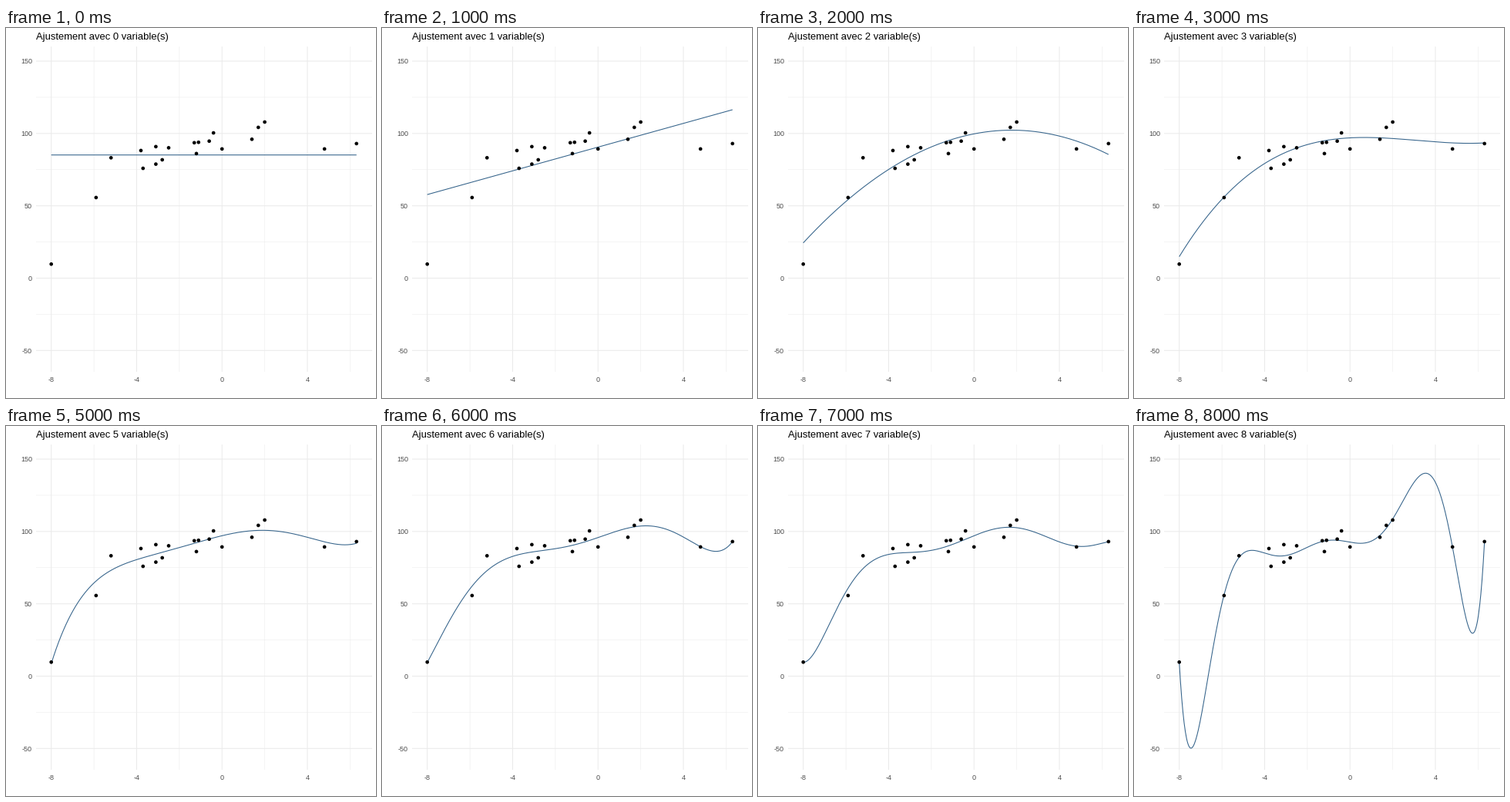
Recreate the animation shown at these times as a matplotlib script. Size 480 by 480 pixels, loop 9 s.

```python
import matplotlib.pyplot as plt
import numpy as np
from matplotlib.animation import FuncAnimation
from numpy.polynomial import Polynomial

SIZE, DPI = 480, 72
LEFT, RIGHT, TOP, BOTTOM = 38.9, 474.5, 24.2, 446.3
GRID, TICK, BLUE = "#ebebeb", "#4d4d4d", "#36648b"
MAX_DEGREE = 8

# The plotted observations; every curve is a least-squares fit to them.
POINTS = [(-8, 9.7), (-5.9, 55.7), (-5.2, 83.2), (-3.8, 88.2), (-3.7, 75.9),
          (-3.1, 90.9), (-3.1, 78.8), (-2.8, 81.8), (-2.5, 90.1), (-1.3, 93.6),
          (-1.2, 86.1), (-1.1, 93.9), (-0.6, 94.7), (-0.4, 100.4), (0, 89.3),
          (1.4, 96), (1.7, 104.2), (2, 107.9), (4.8, 89.3), (6.3, 93)]
x, y = np.transpose(POINTS)
xs = np.linspace(x.min(), x.max(), 500)

plt.rcParams.update({"font.family": "Liberation Sans",
                     "axes.unicode_minus": False})
fig = plt.figure(figsize=(SIZE / DPI, SIZE / DPI), dpi=DPI, facecolor="white")
ax = fig.add_axes([LEFT / SIZE, 1 - BOTTOM / SIZE,
                   (RIGHT - LEFT) / SIZE, (BOTTOM - TOP) / SIZE])
ax.set(xlim=(-8.715, 7.015), ylim=(-64.9, 160))
ax.set_frame_on(False)
ax.set_axisbelow(True)

for axis, step, pad in ((ax.xaxis, 4, 6), (ax.yaxis, 50, 5)):
    axis.set_major_locator(plt.MultipleLocator(step))
    axis.set_minor_locator(plt.MultipleLocator(step / 2))
    axis.set_major_formatter("{x:.0f}")
    axis.set_tick_params(which="both", length=0, pad=pad, labelsize=9,
                         labelcolor=TICK)
ax.grid(which="major", color=GRID, lw=1.07, snap=False)
ax.grid(which="minor", color=GRID, lw=0.53, snap=False)

line, = ax.plot([], [], color=BLUE, lw=1.07, snap=False, zorder=3,
                solid_capstyle="butt")
# One size per point keeps the dots at sub-pixel positions.
ax.scatter(x, y, s=np.full(x.size, 4.65 ** 2), color="black", lw=0,
           snap=False, zorder=4)
title = fig.text(LEFT / SIZE, 1 - 15 / SIZE, "", fontsize=13, color="black")


def draw(degree):
    line.set_data(xs, Polynomial.fit(x, y, degree)(xs))
    title.set_text(f"Ajustement avec {degree} variable(s)")
    return line, title


anim = FuncAnimation(fig, draw, frames=MAX_DEGREE + 1, interval=1000,
                     repeat=True, repeat_delay=0, blit=False)
plt.show()
```
